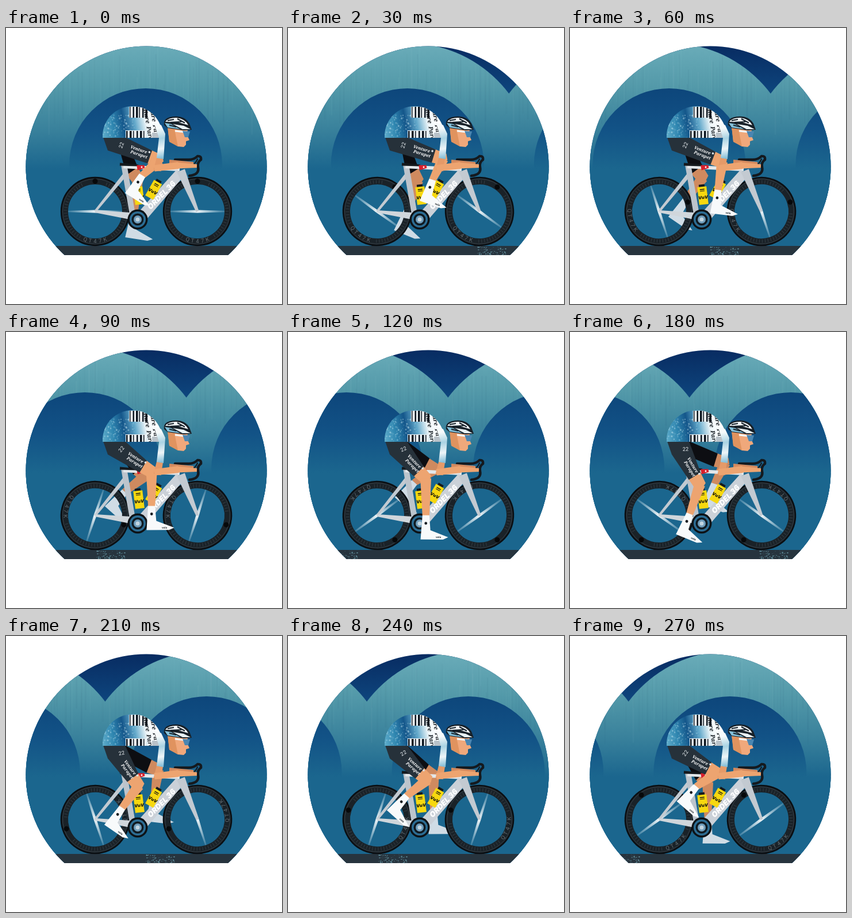
Write an HTML page with a canvas that moves like this. It is 480 px wide and 480 px high and loops after 300 ms.

```html
<!DOCTYPE html>
<html lang="en">
<head>
<meta charset="utf-8">
<title>Cyclist</title>
<style>
  html, body { margin: 0; height: 100%; overflow: hidden; background: #fff; }
  canvas { display: block; }
</style>
</head>
<body>
<canvas id="stage" width="480" height="480"></canvas>
<script>
const ctx = document.getElementById('stage').getContext('2d');
const TAU = Math.PI * 2, STEP = 30, STEPS = 10;
const HUBS = [[155, 319], [333, 319]], CRANK = [229, 333], HIP = [188, 203];
const BASE = '#1b668e';
const slab = size => `italic 900 ${size}px "Noto Serif", serif`;
const sans = size => `italic 900 ${size}px Inter, sans-serif`;

function poly(color, ...points) {
  ctx.beginPath();
  points.forEach(([x, y]) => ctx.lineTo(x, y));
  ctx.fillStyle = color;
  ctx.fill();
}

// Straight limb or pipe that tapers from width w0 to w1
function tube(color, [x0, y0], [x1, y1], w0, w1 = w0) {
  const length = Math.hypot(x1 - x0, y1 - y0);
  const nx = (y0 - y1) / length / 2, ny = (x1 - x0) / length / 2;
  poly(color, [x0 + nx * w0, y0 + ny * w0], [x1 + nx * w1, y1 + ny * w1],
    [x1 - nx * w1, y1 - ny * w1], [x0 - nx * w0, y0 - ny * w0]);
}

function disc([x, y], r, color) {
  ctx.beginPath();
  ctx.arc(x, y, r, 0, TAU);
  ctx.fillStyle = color;
  ctx.fill();
}

function ring(r, width, color, from = 0, to = TAU) {
  ctx.beginPath();
  ctx.arc(0, 0, r, from, to);
  ctx.lineWidth = width;
  ctx.strokeStyle = color;
  ctx.stroke();
}

function box(color, x, y, w, h) {
  ctx.fillStyle = color;
  ctx.fillRect(x, y, w, h);
}

function curve(color, width, path) {
  ctx.strokeStyle = color;
  ctx.lineWidth = width;
  ctx.stroke(new Path2D(path));
}

function shape(color, path) {
  ctx.fillStyle = color;
  ctx.fill(new Path2D(path));
}

function at([x, y], angle, draw) {
  ctx.save();
  ctx.translate(x, y);
  ctx.rotate(angle);
  draw();
  ctx.restore();
}

// Draw inside the part of a circle above the line y = bottom
function inDisc(x, y, r, bottom, draw) {
  ctx.save();
  ctx.beginPath();
  ctx.rect(0, 0, 480, bottom);
  ctx.clip();
  ctx.beginPath();
  ctx.arc(x, y, r, 0, TAU);
  ctx.clip();
  draw();
  ctx.restore();
}

function label(text, x, y, font, color) {
  ctx.font = font;
  ctx.fillStyle = color;
  ctx.textAlign = 'center';
  ctx.textBaseline = 'middle';
  ctx.fillText(text, x, y);
}

function gradient(x0, y0, x1, y1, ...colors) {
  const g = ctx.createLinearGradient(x0, y0, x1, y1);
  colors.forEach((color, i) => g.addColorStop(i / (colors.length - 1), color));
  return g;
}

function seeded(seed) {
  return () => (seed = (seed * 16807) % 2147483647) / 2147483647;
}

function background(k) {
  const centers = [-1, 0, 1, 2].map(i => 243 + 353 * (i - k / STEPS));
  const hill = gradient(0, 32, 0, 245, '#69abb8', '#5399a9', '#3a829c', BASE);
  const dome = gradient(0, 105, 0, 245, '#0d467b', '#125286', BASE);
  box(gradient(0, 32, 0, 115, '#082c62', '#0e467e'), 0, 0, 480, 480);
  centers.forEach(x => disc([x, 247], 221, hill));
  centers.forEach(x => inDisc(x, 247, 221, 480, () => {
    const rand = seeded(71);
    for (let i = 0; i < 80; i++) {
      const color = i % 2 ? '190,230,230' : '0,50,80';
      box(`rgba(${color},${rand() * .04})`, x - 176 + rand() * 352, 30 + rand() * 70, 1 + rand() * 2, 90);
    }
  }));
  centers.forEach(x => disc([x, 238], 133, dome));
  box(BASE, 0, 245, 480, 140);
}

function ground(k) {
  const rand = seeded(19), left = 415 - 86 * (k % 5);
  box('#27343e', 0, 379, 480, 16);
  for (let i = 0; i < 80; i++) {
    const size = .5 + rand() * 1.2;
    box(`rgba(115,170,185,${.3 + rand() * .5})`, left + rand() * 49, 380 + rand() * 14, size * 1.4, size);
  }
}

function wheel(hub, angle) {
  at(hub, angle, () => {
    ring(53, 12, '#1a2228');
    ring(59, 2.4, '#0a0e12');
    ring(56.5, .7, '#414b52');
    ctx.setLineDash([1, 4]);
    ring(51.5, 6, 'rgba(150,165,175,.2)', 2.1, 4.3);
    ring(51.5, 6, 'rgba(150,165,175,.2)', 5.1, 7.3);
    ctx.setLineDash([]);
    disc([0, -52.5], 4.5, '#07090b');
    [...'QT47K'].forEach((letter, i) => at([0, 0], (2 - i) * .17, () =>
      label(letter, 0, 52, '9.5px Roboto, sans-serif', '#626d74')));
    const fade = gradient(-47, 0, 47, 0, 'rgba(200,225,235,.2)', '#eef4f7', 'rgba(200,225,235,.2)');
    [-47, 47].forEach(x => tube(fade, [0, 0], [x, 0], 5, 2.5));
  });
}

function leg(k, near) {
  const swing = (mean, reach, peak) => mean + reach * Math.cos((k - peak) * TAU / STEPS);
  const knee = [swing(247.7, 22, .9), swing(246.4, 19, 5.8)];
  const ankle = [swing(229.5, 28, 2.1), swing(291, 34, 4.9)];
  const foot = swing(.36, .38, 8.4);
  const thigh = Math.atan2(knee[1] - HIP[1], knee[0] - HIP[0]);
  const c = Math.cos(thigh), s = Math.sin(thigh);
  // along: toward the knee, back: toward the hamstring
  const onThigh = (along, back) =>
    [knee[0] + along * c - back * s, knee[1] + along * s + back * c];
  const skin = near ? '#eda470' : '#cf8a5f';

  poly(skin, onThigh(-19, 12), onThigh(-19, -12), onThigh(3, -10), onThigh(8, 0), onThigh(-2, 11));
  tube(skin, knee, ankle, 19, 12);
  poly(near ? '#26313a' : '#0d0e12', [near ? 169 : 190, 190], [near ? 177 : 198, 213],
    onThigh(-17, 12), onThigh(-17, -12), [207, 190]);

  at(ankle, foot, () => {
    poly(near ? '#f8fafb' : '#d0dce5', [-6, -1], [6, -1], [8, 25], [39, 37], [30, 41], [-9, 41]);
    if (!near) return;
    disc([0, 13], 2.4, '#171d22');
    label('vela', 22, 37, 'bold 4.5px Inter, sans-serif', '#222a30');
  });
  if (!near) return;
  at([(HIP[0] + knee[0]) / 2 + 2, (HIP[1] + knee[1]) / 2], thigh, () => {
    label('Venture', 0, -5, slab(7.5), '#fff');
    label('Parapet', 3, 3, slab(7.5), '#fff');
    disc([19, -7], 1.8, '#d9e0e4');
  });
  at([201, 204], (thigh - 1.05) * 1.7, () => label('22', 0, 0, '9px Inter, sans-serif', '#e8edf0'));
}

function bottle(center, angle) {
  at(center, angle, () => {
    box('#15191c', -5, -19, 10, 6);
    box('#f7d80f', -8, -15, 16, 31);
    box('#1a1a14', -4, -11, 8, 1.5);
    box('#1a1a14', -4, -8, 8, 1);
    label('VuV', 0, 4, sans(7.5), '#17170f');
  });
}

function bike() {
  const [rear, front] = HUBS;
  tube('#c3cad1', [206, 256], rear, 7, 4);
  tube('#d0d6db', rear, [224, 328], 4, 13);
  tube('#bcc4cc', [205, 237], [221, 330], 10);
  tube('#e3e7ea', [204, 241], [302, 246], 6);
  tube('#15191d', [198, 237], [230, 239], 5, 3);
  tube('#d8202c', [228, 243], [241, 241], 9, 5);
  disc([236, 242], 1.4, '#fff');
  tube('#cbd1d8', [303, 252], [236, 328], 17, 19);
  tube('#c3cad1', [304, 248], front, 15, 5);
  at([271, 291], -.8, () => label('ORDEL 36', 0, 0, sans(13), '#fff'));
  bottle([231, 291], -.12);
  bottle([257, 281], .52);
  ['#0d1216', '#2c6d94', '#101a21', '#6f9dbb', '#c3d5e0'].forEach((color, i) =>
    disc(CRANK, 17.5 - i * 3.5, color));
}

function jersey() {
  inDisc(220, 188, 52, 191, () => {
    const rand = seeded(5);
    box(gradient(168, 178, 262, 160, '#5aa9c8', '#2f86b0', '#14568a', '#62a8ca', '#eef6f9', '#fff'),
      160, 130, 120, 61);
    for (let i = 0; i < 120; i++) {
      disc([168 + rand() * 55, 150 + rand() * 40], .4 + rand() * 1.3, `rgba(210,238,246,${rand() * .5})`);
    }
    box('#eef3f5', 214, 137, 30, 19);
    box('#e9eff2', 208, 178, 36, 13);
    for (let i = 0; i < 6; i++) {
      box('#0d1620', 215 + i * 5.5, 137, 1.5 + i % 3, 19);
      box('#0d1620', 209 + i * 6, 179, 1.5 + (i + 1) % 3, 12);
    }
    for (let i = 0; i < 2; i++) {
      at([256 - i * 11, 155 + i * 3], 1.4, () => {
        label('Venture', -12, 0, slab(10), '#10161c');
        label('Parapet', 34, 0, slab(10), '#10161c');
      });
    }
    box('#b9c2c9', 254, 182, 20, 9);
  });
}

function arm() {
  tube('#d48a5e', [284, 235], [326, 236], 12, 6);
  tube('#e59a68', [268, 224], [263, 248], 11, 13);
  tube('#eda470', [258, 244], [300, 239], 11, 12);
  tube('#eda470', [296, 239], [332, 240], 11, 6);
  poly(gradient(262, 175, 270, 228, '#f6fafb', '#a9d3e3', '#eef5f8', '#7dbbd6'),
    [257, 164], [270, 169], [277, 184], [274, 228], [262, 226], [266, 191]);
}

function handlebar() {
  ctx.lineCap = 'round';
  curve('#14191e', 4.5, 'M294 229H318Q327 229 333 223Q340 222 339 229Q332 234 334 242Q337 255 319 257');
  curve('#14191e', 2, 'M333 228Q330 235 324 239');
  ctx.lineCap = 'butt';
}

function head() {
  shape('#f0a87b', 'M281 170L316 176L315 186L319 195L313 197V203L309 207L299 206L284 197Z');
  poly('#e0935f', [281, 172], [293, 176], [299, 206], [284, 198]);
  tube('#f4f7f8', [294, 179], [319, 182], 3);
  shape('#4a86b2', 'M307 179L320 180L317 190H311Z');
  shape('#172028', 'M275 169Q273 158 285 155Q309 150 319 166L323 177L309 178L281 174Z');
  shape('#f3f7f9', 'M277 163Q282 156 296 156Q312 158 317 169L300 164Z');
  poly('#83c0da', [276, 165], [287, 167], [303, 176], [281, 173]);
  poly('#e9f2f5', [290, 167], [309, 170], [321, 176], [307, 176]);
  curve('#18232c', 2, 'M281 161L292 159M286 164L305 163M298 158L311 165M284 169L296 172');
}

function render(now) {
  const k = Math.floor(now / STEP) % STEPS;
  const spin = k * TAU / STEPS;
  ctx.clearRect(0, 0, 480, 480);
  inDisc(244, 241, 209.5, 395, () => {
    background(k);
    ground(k);
    leg(k + STEPS / 2, false);
    HUBS.forEach(hub => wheel(hub, spin));
    bike();
    leg(k, true);
    head();
    jersey();
    handlebar();
    arm();
  });
  requestAnimationFrame(render);
}

requestAnimationFrame(render);
</script>
</body>
</html>
```
